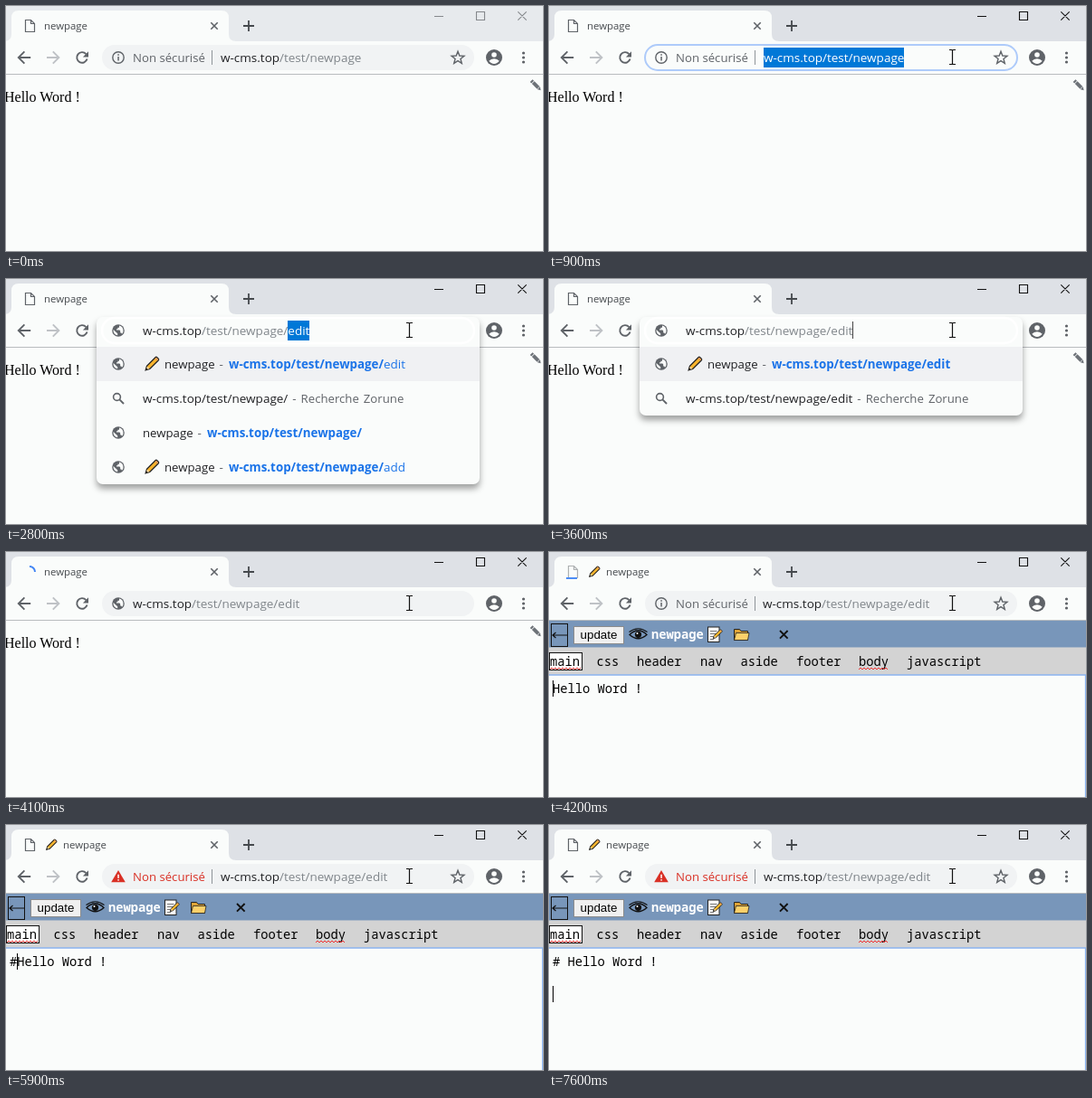
Animation, 593 px wide and 271 px high, one loop 8000 ms. Source, as an HTML page:

```html
<!DOCTYPE html>
<html lang="fr">
<head>
<meta charset="utf-8">
<title>newpage</title>
<style>
html, body { margin: 0; width: 100%; height: 100%; overflow: hidden; background: #fafcfb; }
svg { display: block; width: 593px; height: 271px; }
text { white-space: pre; font: 13.5px "Open Sans", sans-serif; }
.chip { font-size: 13.2px; }
.hint { font-size: 13.2px; word-spacing: 1.6px; }
.tab { font-size: 11.4px; }
.bold { font-size: 13.35px; font-weight: 700; }
.mono { font: 13.75px "Noto Sans Mono", monospace; }
.heavy { font-weight: 700; }
.serif { font: 16px "Liberation Serif", serif; }
.button { font: 13.33px "Liberation Sans", sans-serif; }
.popup { filter: drop-shadow(0 5px 3.5px rgba(0, 0, 0, .36)); }
</style>
</head>
<body>
<svg id="stage" viewBox="0 0 593 271"></svg>
<script>
const LOOP = 8000;
const BG = '#fafcfb', INK = '#202124', GREY = '#5f6368', PALE = '#80868b';
const BLUE = '#1a73e8', SELECT = '#0078d7', RED = '#d93025';
const HOST = 'w-cms.top', PAGE = '/test/newpage', CHAR = 8.25;

const stage = document.getElementById('stage');
const ruler = document.createElement('canvas').getContext('2d');

function widthOf(s) {
  ruler.font = '13.5px "Open Sans", sans-serif';
  return ruler.measureText(s).width;
}

const rect = (x, y, w, h, fill, more = '') =>
  `<rect x="${x}" y="${y}" width="${w}" height="${h}" fill="${fill}" ${more}/>`;
const line = (d, color, w = 1, more = '') =>
  `<path d="${d}" fill="none" stroke="${color}" stroke-width="${w}" ${more}/>`;
const shape = (d, fill, more = '') => `<path d="${d}" fill="${fill}" ${more}/>`;
const disc = (x, y, r, fill, more = '') =>
  `<circle cx="${x}" cy="${y}" r="${r}" fill="${fill}" ${more}/>`;
const label = (x, y, s, fill, cls = '') =>
  `<text x="${x}" y="${y}" fill="${fill}" class="${cls}">${s}</text>`;
const span = (s, fill, cls = '') => `<tspan fill="${fill}" class="${cls}">${s}</tspan>`;
const at = (x, y, body, more = '') => `<g transform="translate(${x} ${y}) ${more}">${body}</g>`;

// ---- icons ----
const globe = y => at(124, y, disc(0, 0, 6.8, GREY) +
  shape('M-5.4-1L-2 2.2-.8 3.2V5.3C-4 4.8-5.8 2-5.4-1Z', BG) +
  shape('M1-5.4C4-4.8 5.6-2.4 5.5 .4 5.4 2 4.7 3.1 4 3.8L3.3 2.6H2.2V.4L1.4-.4H-2V-1.8H-.6V-3.2H1Z', BG));

const lens = y => disc(122.5, y - 1.5, 3.9, 'none', `stroke="${GREY}" stroke-width="1.6"`) +
  line(`M125.4 ${y + 1.4}L130 ${y + 6}`, GREY, 1.9);

const pencil = (x, y, scale = 1) => at(x, y,
  shape('M-10.5 0L-6-2.5H8.6Q10-2.5 10-1.2V1.2Q10 2.5 8.6 2.5H-6Z', '#f9b52e', 'stroke="#222" stroke-width="1.4"') +
  shape('M-6-1.8V1.8L-9.5 0Z', '#f6dfb5') + rect(7.3, -1.8, 2, 3.6, '#e59a5a') +
  shape('M-10.5 0L-8-1.4V1.4Z', '#222'),
  `rotate(-45) scale(${scale})`);

const sheet = (opacity = 1) => line('M21.5 15.5H27.5L31.5 19.5V28.5H21.5ZM27.5 15.5V19.5H31.5',
  GREY, 1.2, `opacity="${opacity}"`);

function star() {
  const pts = [];
  for (let i = 0; i < 10; i++) {
    const r = i % 2 ? 3.1 : 7.3, a = (i / 5 - .5) * Math.PI;
    pts.push((499 + r * Math.cos(a)).toFixed(2) + ',' + (57.5 + r * Math.sin(a)).toFixed(2));
  }
  return `<polygon points="${pts.join(' ')}" fill="none" stroke="${GREY}" stroke-width="1.4"/>`;
}

const info = () => disc(124, 57, 6.2, 'none', `stroke="${GREY}" stroke-width="1.4"`) +
  rect(123.3, 56, 1.5, 4.5, GREY) + rect(123.3, 53.2, 1.5, 1.6, GREY);

const warning = () => shape('M124 50L131.8 63.3H116.2Z', RED) +
  rect(123.3, 54.7, 1.5, 4.2, '#fff') + rect(123.3, 60.1, 1.5, 1.5, '#fff');

// ---- browser window ----
function frame(t) {
  const active = t >= 900, ctl = active ? '#111' : '#85888c';
  return rect(0, 0, 593, 39, active ? '#dee1e6' : '#e7eaed') +
    shape('M-2 39Q6 39 6 31V13Q6 5 14 5H238Q246 5 246 13V31Q246 39 254 39Z', BG) +
    line('M226.3 18.3L233.7 25.7M233.7 18.3L226.3 25.7', GREY, 1.6) +
    line('M262 22H274M268 16V28', '#45494d', 1.8) +
    line('M473 11.5H483M519.5 6.5H528.5V15.5H519.5ZM565.3 6.3L574.7 15.7M574.7 6.3L565.3 15.7', ctl, 1.1) +
    rect(0, 39, 593, 36, BG) + rect(0, 75, 593, 1, '#b9bcbf') +
    line('M27.2 57H14M20.4 50.4L13.8 57 20.4 63.6', GREY, 1.9) +
    line('M45 57H58.2M51.8 50.4L58.4 57 51.8 63.6', '#bfc2c6', 1.9) +
    line('M88.4 53.1A5.8 5.8 0 1 0 89.6 58.6', GREY, 1.9) + shape('M91 50.3V56.4H84.9Z', GREY) +
    disc(539, 57, 9, GREY) + disc(539, 54, 2.8, BG) +
    shape('M533.3 60.8Q535.5 58.3 539 58.3T544.7 60.8Q542.6 63.9 539 63.9T533.3 60.8Z', BG) +
    [52, 57, 62].map(y => disc(571.5, y, 1.6, GREY)).join('');
}

function tab(t) {
  const title = x => label(x, 26, 'newpage', '#45494d', 'tab');
  if (t < 4100) return sheet() + title(42);
  if (t < 4200) return line('M26 16A6 6 0 0 1 32 22', '#4285f4', 2) + title(42);
  const p = Math.min(1, (t - 4200) / 500);
  return sheet(.5 + .5 * p) + (p < 1 ? rect(19, 28, 12 * (1 - p), 2, '#4c8df6') : '') +
    pencil(50, 22, .72) + title(63);
}

// ---- address bar ----
function address(t) {
  let x = 237, host = HOST, path = PAGE, sel = '';
  if (t >= 900 && t < 1200) { host = path = ''; sel = HOST + PAGE; }
  else if (t >= 1200 && t < 2000) { x = 140; path = '/test/'; sel = 'newpage'; }
  else if (t >= 2000 && t < 2700) x = 140;
  else if (t >= 2700 && t < 4100) {
    x = 151;
    const n = typed(t);
    path += '/' + 'edit'.slice(0, n);
    sel = 'edit'.slice(n);
  } else if (t >= 4100) {
    path += '/edit';
    x = t < 4200 ? 140 : t < 4300 ? 236 : 237;
  }
  const end = Math.floor(x + widthOf(host + path));
  const caret = t >= 2000 && t < 2500 || t >= 3600 && t < 4100;
  return (sel ? rect(end, 46, Math.round(widthOf(sel)), 22, SELECT) : '') +
    `<text x="${x}" y="62">${span(host, INK)}${span(path, PALE)}${span(sel, '#fff')}</text>` +
    (caret ? rect(end, 47, 1, 19, '#444') : '');
}

function typed(t) {
  return [3100, 3300, 3400, 3600].filter(k => t >= k).length;
}

function omnibox(t) {
  const focus = t >= 900 && t < 4100, editing = t >= 1200 && t < 4200;
  const popup = t >= 2700 && t < 4100;
  let s = popup ? suggestions(typed(t)) : focus
    ? rect(106, 43, 411, 28, BG, 'rx="14" stroke="#aecbfa" stroke-width="2"')
    : rect(106, 43, 411, 28, '#f1f3f4', 'rx="14"');
  if (editing) s += globe(57);
  else {
    const alert = t >= 5900;
    s += (alert ? warning() : info()) +
      label(140, 62, 'Non sécurisé', alert ? RED : GREY, 'chip') +
      rect(227, 49, 1, 16, '#8f9499') + star();
  }
  return s + address(t);
}

function pageRow(y, bold, rest, drawn) {
  const x = drawn ? 175 : 151;
  return globe(y) + (drawn ? pencil(161, y, .92) : '') +
    label(x, y + 5, 'newpage', INK, 'chip') + label(x + 60.5, y + 5, '-', GREY) +
    `<text x="${x + 71}" y="${y + 5}">${span(bold, BLUE, 'bold')}${span(rest, BLUE)}</text>`;
}

function suggestions(n) {
  const base = HOST + PAGE + '/', query = base + 'edit'.slice(0, n);
  let s = rect(100, 42, 423, n ? 109 : 185, BG, 'rx="7" class="popup"') +
    rect(106, 43, 411, 28, BG, 'rx="14" stroke="#fff" stroke-width="2.5"') +
    rect(100, 75, 423, 38, '#f0f1f3') + pageRow(94, query, 'edit'.slice(n), true) + lens(132) +
    `<text x="151" y="137">${span(query, INK)}${span(' - Recherche Zorune', GREY, 'hint')}</text>`;
  if (!n) s += pageRow(170, base, '', false) + pageRow(208, base, 'add', true);
  return s;
}

// ---- page ----
function viewer() {
  return label(-2, 106, 'Hello Word !', '#000', 'serif') +
    at(585, 87.5, rect(-7, -2, 2.2, 4, '#6d7278') + rect(-4, -2, 8, 4, '#6d7278') +
      shape('M4.6-2L8 0 4.6 2Z', '#6d7278'), 'rotate(45)');
}

function squiggle(x, w) {
  let d = `M${x} 130`;
  for (let i = 0; i < w / 2; i++) d += `l2 ${i % 2 ? 2 : -2}`;
  return line(d, '#f03030', 1);
}

function editorBars() {
  const menu = { main: 1, css: 52.5, header: 97, nav: 167, aside: 211.5, footer: 273, body: 342, javascript: 395 };
  return rect(0, 76, 593, 30, '#7896ba') + rect(0, 105, 593, 1, '#a9b7c8') +
    rect(2.5, 79.5, 18, 25, 'none', 'stroke="#111"') +
    line('M20 92H4M7.5 89L4 92 7.5 95', '#111', 1.2) +
    rect(27.5, 82.5, 55, 19, '#f0f0f0', 'stroke="#8c8c8c"') + label(34.6, 96, 'update', '#000', 'button') +
    line('M89 91.5Q98.5 82 108 91.5 98.5 100 89 91.5Z', '#111', 1.3) +
    disc(98.5, 91.3, 3.6, '#111') + disc(97.5, 90, 1, '#fff') +
    line('M88.5 88.5Q98.5 81 108.5 88.5', '#111', 1.1) +
    label(113, 96, 'newpage', '#fff', 'mono heavy') +
    rect(175.5, 83, 12.5, 16.5, '#fafafa', 'stroke="#222"') +
    line('M178 87.5H185.5M178 90.5H185M178 93.5H183M178 96.5H182', '#777') + pencil(186, 91, .62) +
    shape('M204.5 97.5V85.5H210.5L212 87.5H219.5V97.5Z', '#e0a437', 'stroke="#222"') +
    shape('M204.5 97.5L206.5 89.5H221L219.5 97.5Z', '#fdd06a', 'stroke="#222" stroke-width=".8"') +
    line('M255 87L263.6 95.6M263.6 87L255 95.6', '#111', 1.9) +
    rect(0, 106, 593, 30, '#d3d3d3') + rect(.5, 111.5, 36, 19, '#fff', 'stroke="#111"') +
    Object.entries(menu).map(([s, x]) => label(x, 126, s, '#000', 'mono')).join('') +
    squiggle(1, 33) + squiggle(342, 32);
}

function editor(t) {
  const text = (t < 5900 ? '' : t < 6300 ? '#' : '# ') + 'Hello Word !';
  const col = t < 5900 ? 0 : t < 6300 ? 1 : t < 6800 ? 2 : t < 7400 ? 14 : 0;
  const row = t < 7400 ? 0 : t < 7600 ? 1 : 2;
  const off = t >= 4700 && t < 5200 || t >= 5700 && t < 5900 || t >= 7300 && t < 7400;
  return editorBars() + line('M0 136H592.5V271', '#8ab4f0', 1.3) +
    label(4, 156, text, '#000', 'mono') +
    (off ? '' : rect(Math.floor(4 + col * CHAR), 142 + row * 18, 1, 18, '#000'));
}

// ---- mouse ----
function mouse(t) {
  if (t < 200) return '';
  const p = Math.min(1, (t - 200) / 500), e = 1 - (1 - p) ** 2;
  const x = 504 - 58.5 * e, y = 76 - 19 * e;
  if (y > 71) {
    return at(x, y, shape('M.5 .5V16.5L4.2 13 6.6 18.5 9 17.5 6.6 12H11.5Z', '#fff', 'stroke="#000"'));
  }
  return at(Math.floor(x) + .5, Math.round(y),
    line('M-3.5-8.5H-1Q0-8.5 0-7.5 0-8.5 1-8.5H3.5M0-8V7M-3.5 7.5H-1Q0 7.5 0 6.5 0 7.5 1 7.5H3.5', '#111', 1.2));
}

let shown = -1;
function render(now) {
  const t = Math.floor(now % LOOP / 100) * 100;
  if (t !== shown) {
    shown = t;
    stage.innerHTML = rect(0, 0, 593, 271, BG) + (t < 4200 ? viewer() : editor(t)) +
      frame(t) + tab(t) + omnibox(t) + mouse(t);
  }
}

function tick() {
  render(performance.now());
  requestAnimationFrame(tick);
}
tick();
</script>
</body>
</html>
```
